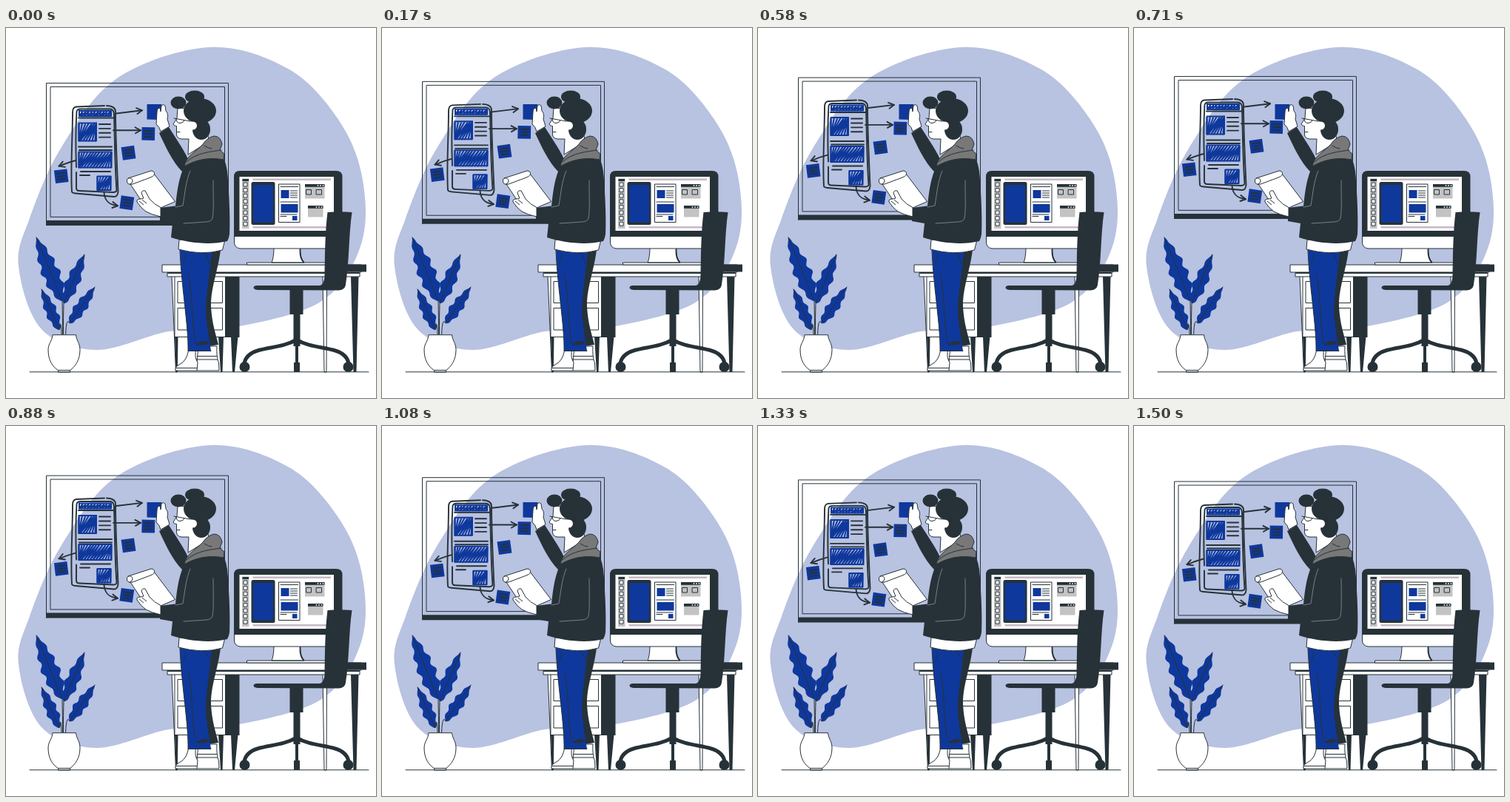
Animation of 500x500 px, one loop 1.54 s. Source, as an HTML page:

```html
<!DOCTYPE html>
<html lang="en">
<head>
<meta charset="utf-8">
<title>Whiteboard planning</title>
<style>
html, body { margin: 0; width: 100%; height: 100%; overflow: hidden; background: #fff; }
svg { display: block; width: 100vw; height: 100vh; }
.dark { fill: #263238; }
.blue { fill: #0f389c; }
.gray { fill: #c3c3c3; }
.hood { fill: #787878; stroke: #263238; }
.white { fill: #fff; stroke: #263238; stroke-linejoin: round; }
.line, .pen, .fold, .hatch, .leg { fill: none; stroke: #263238; stroke-linecap: round; stroke-linejoin: round; }
.pen { stroke-width: 1.9; }
.leg { stroke-width: 5; }
.fold { stroke: #7b7f81; }
.hatch { stroke: #0f389c; stroke-width: 2; }
</style>
</head>
<body>
<svg viewBox="0 0 500 500">
  <g id="back"></g>
  <g id="board">
    <path class="line" d="M54.5 192V0H300.5V192M60 180.500V5H295.500V180.500Z"/>
    <path class="dark" d="M54 185.500H301V192.500H54Z"/>
    <g id="sketch" transform="translate(0 -74.5)">
      <path class="pen" d="M133 105L95 106.500Q90 107 90 114C90 150 87 190 89 221Q89 223 94 223.500L146 228Q151 228 151.500 221C150 185 148 150 148 113Q148 105.500 136 105"/>
      <path class="pen" d="M95 188C94 160 94.500 130 95.500 113Q96 109.500 101 109.500H141Q145.500 110 146 116C147 150 147 185 149.500 219Q149 222 145 222L99 220Q95 220 95 216V195"/>
      <path class="pen" d="M98 121.500H145M98 160.500H143M99 165H143M101 194H141M100 199H113"/>
    </g>
  </g>

  <g id="plant"></g>
  <path class="white" d="M63 414.700H94.500C95 422 100 426 100 435C100 449 93 458 86.500 462.500V465H70.500V462.500C63 458 57 449 57 435C57 426 63 422 63 414.700ZM70.500 462.500H86.500"/>

  <!-- desk -->
  <path class="white" d="M224 335H228.500L231 465H229.500ZM428 335H433.500L433 465H430Z"/>
  <path class="white" d="M228 335H296.500V417.500H228ZM232 342.500H292.500V371.500H232ZM232 378.500H292.500V408H232Z"/>
  <path class="dark" d="M296 334H315.500V418H296ZM228 417H232.500L231.800 465H229.500ZM287 417H294L292.500 465H290ZM304 417H313.500L309 465H306ZM466 335H476.500L473.500 465H469.500Z"/>
  <path class="white" d="M218 331H478V336H218Z"/>
  <path class="dark" d="M218 329.500H478V332H218Z"/>
  <path class="white" d="M211 320H480V330H211Z"/>
  <path class="dark" d="M460.500 319.500H487V329.500H460.500Z"/>

  <!-- monitor -->
  <path class="white" d="M362 297H397.500Q397 311 403 317H359Q362 310 362 297ZM325.500 317H432V320H325.500Z"/>
  <path class="pen" d="M397.500 299Q397 311 402 316"/>
  <rect class="white" x="308.500" y="270" width="145.500" height="28" rx="8"/>
  <path class="dark" d="M316 193H446Q454.500 193 454.500 201V282H308V201Q308 193 316 193Z"/>
  <path fill="#fff" d="M315.500 201H443V274H315.500Z"/>
  <g id="screen"></g>

  <!-- chair -->
  <path class="dark" d="M434.500 249Q451 247.500 467.500 249C463 280 464 315 459 347Q458 354 450 354.500L340 354Q334.500 353.500 334.500 350.500Q335 348 339 348H424Q430 347 430.500 335C431 305 431 278 434.500 249Z"/>
  <path class="dark" d="M383.500 354H401.500V387H397.500V430H388.500V387H383.500ZM391 428H395V452H397V465H389V452H391Z"/>
  <path id="spoke" class="leg" d="M393 421C376 431 357 431 340 436Q323 441 321.500 456"/>
  <circle id="wheel" class="dark" cx="322.500" cy="458" r="7"/>
  <use href="#spoke" transform="matrix(-1 0 0 1 785 0)"/>
  <use href="#wheel" transform="matrix(-1 0 0 1 785 0)"/>

  <path class="line" d="M32 464.800H490"/>

  <!-- person -->
  <path class="white" d="M260 430H285Q284 443 287.500 453L288 463H257ZM258 443.500H285M257 448H286"/>
  <path class="white" d="M247 433H257Q254 445 259 452L258 463H229Q228 458 234 455Q245 450 247 433ZM229 459.500H258"/>
  <path class="dark" d="M268 300H290C286 330 277 350 277 375C278 400 284 415 287 428L268 431Z"/>
  <path class="blue" d="M235 298L278 303C275 335 270 360 270 385Q272 410 277 436L246 436.500C247 405 237 350 235 298Z"/>
  <path class="line" d="M235 300C237 350 247 405 246 436.500H277M271 306Q273 318 278 320M243 306Q242 316 238 319M247 335C254 370 249 395 257 427"/>
  <path class="dark" d="M257 428Q266 420 275 425Q270 430 257 428Z"/>
  <path class="white" d="M234 286H296L292.500 300Q265 308 233 299Z"/>

  <path class="blue" d="M190.500 103H210.500L208 124L190.500 123.500Z"/>
  <path class="white" d="M232 108L231 122L226 130Q227 132.500 230.500 132.500L230.500 144Q231 149 237 150H247L246 171L275 153L262 110Z"/>
  <g id="hair" class="dark"></g>
  <circle cx="252.500" cy="132" r="5.500" fill="#fff"/>
  <path class="line" d="M227 122L249 126M230 122.500Q230 128.500 235 128.500Q240 128.500 241 125M231.500 140.500H235"/>

  <path class="dark" d="M207 142L220 134C230 150 239 162 246 177L258 175C270 170 284 170 291 170Q299 182 300 205C302 235 303 260 302 279Q301 285 299 288C275 294 245 290 223 283L225 264L208 261V243L229 240.500C231 222 233 207 238 194C225 181 216 161 207 142Z"/>
  <path class="hood" d="M241 187C243 173 258 166 266 157Q272 148 281 146Q290 146 292 157L289 165L295 170L294 178C275 174 256 178 241 187Z"/>
  <path class="line" d="M244 181C257 168 279 167 291 165M268 159Q274 163 278 163"/>
  <path class="fold" d="M280 206C280 230 281 245 279 257Q278 261 271 262L240 264M249 193C243 207 242 222 239 240L229 242"/>

  <path class="white" d="M203 130L204 114Q204 108 208 108L209 113L210 105Q213 102 215 105L216 112Q220 116 218 123L221 133L209 140Q208 134 203 130Z"/>
  <path class="white" d="M168 211L200 197L228.500 234.500L208 243.500L184 235Z"/>
  <path class="white" d="M165 203L196 193Q201 193 200.500 198Q199 201 195 202L171 211Q165 212.500 163.500 208Q163 204 165 203ZM165 203Q171 202 171 207Q170 211 167 211"/>
  <path class="white" d="M177 235Q176 231 182 231L186 230L183 223Q184 219 188 220L194 231Q201 239 209 242.500V255Q196 252 189 248Q183 244 177 235ZM180 234L186 239M184 232L190 237"/>
</svg>
<script>
const $ = id => document.getElementById(id);
const NS = "http://www.w3.org/2000/svg";

function add(parent, tag, attrs) {
  const el = document.createElementNS(NS, tag);
  for (const k in attrs) el.setAttribute(k, attrs[k]);
  return parent.appendChild(el);
}

const path = (parent, cls, d) => add(parent, "path", { class: cls, d });
const rect = (parent, cls, x, y, w, h) =>
  add(parent, "rect", { class: cls, x, y, width: w, height: h });
const clamp = (v, lo, hi) => Math.min(hi, Math.max(lo, v));

let seed = 7;
const random = () => (seed = seed * 16807 % 2147483647) / 2147483647;

// Closed smooth curve through a list of points
function smooth(pts) {
  const at = i => pts[(i + pts.length) % pts.length];
  const d = pts.map((a, i) => {
    const prev = at(i - 1), b = at(i + 1), next = at(i + 2);
    const c1 = a.map((v, j) => v + (b[j] - prev[j]) / 6);
    const c2 = b.map((v, j) => v - (next[j] - a[j]) / 6);
    return `C${c1} ${c2} ${b}`;
  });
  return `M${pts[0]}${d.join("")}Z`;
}

path($("back"), "", smooth([
  [275, 26], [381, 55], [448, 122], [481, 200], [480, 292], [425, 370], [300, 406],
  [220, 410], [122, 435], [48, 407], [17, 322], [32, 257], [75, 161], [150, 68]
])).setAttribute("fill", "#b8c2e1");

// A leaf is a straight rib with a lobed width on both sides
function leaf(tip, base, width, lobes) {
  const dx = tip[0] - base[0], dy = tip[1] - base[1], len = Math.hypot(dx, dy);
  const edge = (t, side) => {
    const wave = 1 + .22 * Math.sin(2 * Math.PI * lobes * t + side);
    const w = side * width * Math.sin(Math.PI * t ** .8) ** .75 * wave / len;
    return [base[0] + dx * t - dy * w, base[1] + dy * t + dx * w];
  };
  const n = lobes * 5, pts = [];
  for (let i = 0; i < n; i++) pts.push(edge(i / n, 1));
  for (let i = n; i > 0; i--) pts.push(edge(i / n, -1));
  path($("plant"), "blue", smooth(pts));
  path($("plant"), "line", `M${tip}L${base}Q${(base[0] + 77) / 2} 390 ${77 + (base[0] - 77) * .4} 414`);
}
leaf([41, 283], [76, 369], 11, 5);
leaf([106, 306], [78, 372], 8.500, 4);
leaf([48, 353], [72, 408], 7.500, 4);
leaf([120, 350], [86, 399], 7.500, 4);

for (const [cx, cy, rx, ry] of [[233, 101, 10.500, 8.500], [255, 93, 13, 8.500], [262, 112, 22, 17], [264, 137, 12, 14]])
  add($("hair"), "ellipse", { cx, cy, rx, ry });

const sketch = $("sketch");

// Marker scribble filling a box
function scribble(x, y, w, h) {
  const pts = [];
  for (let s = -h * .8; s < w; s += 3.600 + random()) {
    pts.push([clamp(x + s, x, x + w), y + h], [clamp(x + s + h * .8, x, x + w), y + random() * 2]);
  }
  path(sketch, "hatch", "M" + pts.join("L"));
  rect(sketch, "hatch", x, y, w, h);
}
scribble(99, 112, 43, 7);
scribble(98.500, 128.500, 23.500, 24);
scribble(98.500, 167.500, 44, 21);
scribble(123.500, 200.500, 18, 18.500);

for (let i = 0; i < 4; i++) path(sketch, "pen", `M126 ${130 + i * 5.900}h15`);

function arrow(shaft, x, y, turn) {
  path(sketch, "pen", `${shaft}L${x} ${y}`);
  path(sketch, "pen", "M-7.500 -4L0 0L-7 4").setAttribute("transform", `translate(${x} ${y}) rotate(${turn})`);
}
arrow("M149 115.500", 184, 111.300, -7);
arrow("M145 138.300", 182, 138.300, 0);
arrow("M94 179Q83 182 75 185.500", 71.500, 186.700, 160);
arrow("M132.500 222C133 232 139 238 147 239.500", 151, 240.300, 10);

function note(x, y, turn) {
  const g = add(sketch, "g", { transform: `translate(${x} ${y}) rotate(${turn})` });
  rect(g, "blue", -8.800, -8.800, 17.600, 17.600);
  path(g, "pen", "M-4.500 -4H5.500M-4.500 0H5.500M-4.500 4H4.500");
}
note(192.300, 143, 1);
note(165.500, 168.800, -8);
note(74.700, 200.300, -7);
note(163.300, 236.300, 8);

// Design app on the monitor
const scr = $("screen");
rect(scr, "gray", 319, 203.500, 9.500, 67.500);
rect(scr, "dark", 319.500, 204, 8.500, 3);
for (let i = 0; i < 8; i++) rect(scr, "white", 321, 209 + i * 7.600, 5, 5);
path(scr, "", "M333.500 204.800H439M333.500 269.200H434").setAttribute("style", "stroke:#c6b9c4;stroke-width:2.4");
rect(scr, "dark", 331.500, 208, 32, 58).setAttribute("rx", 2.500);
rect(scr, "blue", 334, 212, 27, 50.500);
rect(scr, "white", 368.500, 211, 28.500, 51.500);
path(scr, "line", "M371 214.500H394.500M371 235H394.500M371 252H393M371 254.500H379");
for (let i = 0; i < 4; i++) path(scr, "line", `M384.500 ${220 + i * 3}h9`);
rect(scr, "blue", 371.500, 219, 11, 11);
rect(scr, "blue", 371.500, 238, 23, 11.500);
rect(scr, "blue", 387, 254, 6.500, 6);

function panel(x, y, w, h) {
  rect(scr, "gray", x, y, w, h);
  rect(scr, "dark", x, y, w, 3.800);
  for (let i = 0; i < 3; i++)
    add(scr, "circle", { cx: x + w - 2 - i * 3.500, cy: y + 1.900, r: .9, fill: "#fff" });
}
panel(404, 211, 26.500, 19.500);
panel(408, 240, 20.500, 15.500);
path(scr, "line", "M406 218.500h6.500v6.500h-6.500ZM419.500 218.500h7v6.500h-7Z");

// The board drifts linearly up and down, stepped at 24 frames a second
const LOOP = 1540, STEP = 1000 / 24, LAST = 36;
const board = $("board");

function draw(ms) {
  const k = Math.min(LAST, Math.floor((ms % LOOP + 5) / STEP));
  const y = 65.200 + 9.800 * Math.abs(k - 17.500) / 18.500;
  board.setAttribute("transform", `translate(0 ${y.toFixed(2)})`);
}

const start = performance.now();
function tick() {
  draw(performance.now() - start);
  requestAnimationFrame(tick);
}
draw(0);
requestAnimationFrame(tick);
</script>
</body>
</html>
```
